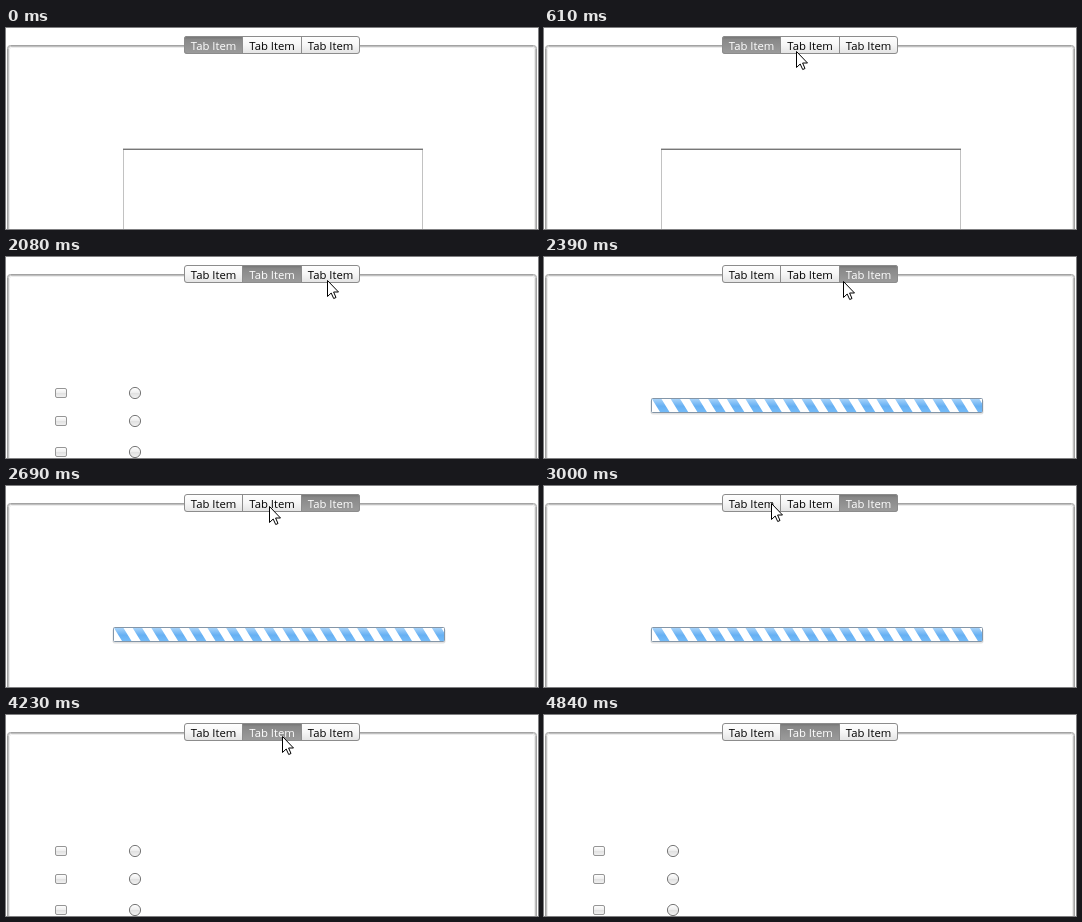
Write an HTML page that moves like this. It is 532 by 201 pixels and loops after 5240 ms.

```html
<!DOCTYPE html>
<html lang="en">
<head>
<meta charset="utf-8">
<title>Tab control</title>
<style>
html, body { margin: 0; width: 100%; height: 100%; overflow: hidden; background: #fff; }
svg { display: block; width: 532px; height: 201px; }
text { font: 11.3px "Open Sans", "Noto Sans", sans-serif; }
text.on { fill: #fff; font-weight: 500; }
</style>
</head>
<body>
<svg viewBox="0 0 532 201">
  <defs>
    <linearGradient id="face" x2="0" y2="1">
      <stop stop-color="#fff"/><stop offset=".5" stop-color="#f6f6f6"/><stop offset="1" stop-color="#e2e2e2"/>
    </linearGradient>
    <linearGradient id="pressed" x2="0" y2="1">
      <stop stop-color="#707070"/><stop offset=".2" stop-color="#888"/><stop offset="1" stop-color="#9c9c9c"/>
    </linearGradient>
    <linearGradient id="mark" x2="0" y2="1">
      <stop stop-color="#fff"/><stop offset=".45" stop-color="#f0f0f0"/>
      <stop offset=".5" stop-color="#e0e0e0"/><stop offset="1" stop-color="#f2f2f2"/>
    </linearGradient>
    <linearGradient id="stripe" x2="0" y2="1">
      <stop stop-color="#a6d2f9"/><stop offset=".55" stop-color="#66b0f3"/><stop offset="1" stop-color="#74bbf8"/>
    </linearGradient>
    <clipPath id="strip"><rect x="178" y="8" width="176" height="18" rx="3"/></clipPath>
    <clipPath id="bar"><rect x="108" y="142" width="330" height="13"/></clipPath>
  </defs>
  <rect width="532" height="201" fill="#fff"/>
  <g fill="none">
    <rect x="3.5" y="19.5" width="525" height="220" rx="2" stroke="#ececec"/>
    <rect x="2.5" y="18.5" width="527" height="220" rx="2" stroke="#c0c0c0"/>
    <rect x="1.5" y="17.5" width="529" height="220" rx="3" stroke="#a3a3a3"/>
  </g>

  <g class="page">
    <path id="sides" d="M117.5 201V121M416.5 201V121" stroke="#c2c2c2"/>
    <path id="top" d="M117 121.5H417" stroke="#777"/>
    <path d="M117 120.5H417" stroke="#c6c6c6"/>
  </g>
  <g class="page" id="choices" fill="url(#mark)"></g>
  <g class="page">
    <rect x="106.5" y="142.5" width="333" height="15" rx="2" fill="#e2e2e2"/>
    <rect x="107.5" y="141.5" width="331" height="14" rx="1" fill="#fff"/>
    <path id="stripes" fill="url(#stripe)" clip-path="url(#bar)"/>
    <rect x="107.5" y="141.5" width="331" height="14" rx="1" fill="none" stroke="#8496a8"/>
  </g>

  <g clip-path="url(#strip)">
    <rect x="178" y="8" width="176" height="18" fill="url(#face)"/>
    <rect id="selected" y="8" height="18" fill="url(#pressed)"/>
    <path d="M236.5 8V26M295.5 8V26" stroke="#8c8c8c"/>
  </g>
  <rect x="178.5" y="8.5" width="175" height="17" rx="2.5" fill="none" stroke="#8c8c8c"/>
  <g id="labels"></g>

  <path id="cursor" d="M.5.5V16.5L4.2 13L6.7 18.5L9 17.5L6.6 12H11.5Z" fill="#fff" stroke="#000"/>
</svg>
<script>
const LOOP = 5240, START = 378, STEP = 76.9, STEPS = 58;
const $ = id => document.getElementById(id);

// Pointer legs between rests: leave and arrive in steps, then the end point.
const entry = { x: 330, y: 170 };
const legs = [
  [0, 3, 252, 23], [3, 6, 253, 11], [6, 8, 258, 16],
  [11, 18, 309, 23], [18, 22, 321, 23],
  [24, 26, 299, 24], [26, 35.5, 214, 17],
  [38, 45, 294, 64], [45, 48, 276, 21],
  [50, 52, 313, 47], [52, 57, 450, 194]
].map(([leave, arrive, x, y]) => ({ leave, arrive, x, y }));
const clicks = [10, 24, 37, 49]; // each click selects the next tab

const tabEdge = i => Math.min(178 + i * 59, 354);
$("labels").innerHTML = [0, 1, 2].map(i =>
  `<text x="${184.8 + i * 58.5}" y="22">Tab Item</text>`).join("");
$("choices").innerHTML = [136, 164, 195].map(y =>
  `<rect x="49.5" y="${y - 4.5}" width="11" height="9" rx="1.5" stroke="#969696"/>
   <circle cx="129" cy="${y}" r="5.6" stroke="#777"/>`).join("");

let stripes = "";
for (let i = -1; i < 18; i++) stripes += `M${108 + i * 18.7} 142h9.5l8 13h-9.5Z`;
$("stripes").setAttribute("d", stripes);

const pages = document.querySelectorAll(".page");
const labels = document.querySelectorAll("text");

function cursorAt(step) {
  const i = legs.findLastIndex(leg => leg.leave <= step);
  const to = legs[i], from = legs[i - 1] || entry;
  const u = Math.min(1, (step - to.leave) / (to.arrive - to.leave));
  const rise = 1 - (1 - u) ** 1.6;
  return {
    x: Math.round(from.x + (to.x - from.x) * u),
    y: Math.round(from.y + (to.y - from.y) * rise)
  };
}

function draw(time) {
  const step = Math.floor((time % LOOP - START) / STEP);
  const tab = clicks.filter(at => step >= at).length % 3;
  pages.forEach((p, i) => p.style.display = i === tab ? "" : "none");
  labels.forEach((l, i) => l.classList.toggle("on", i === tab));
  $("selected").setAttribute("x", tabEdge(tab));
  $("selected").setAttribute("width", tabEdge(tab + 1) - tabEdge(tab));

  const shown = step >= 0 && step < STEPS;
  $("cursor").style.display = shown ? "" : "none";
  let hover = false;
  if (shown) {
    const { x, y } = cursorAt(step);
    $("cursor").setAttribute("transform", `translate(${x} ${y})`);
    hover = tab === 0 && y > 121 && x > 117 && x < 417;
  }
  $("sides").setAttribute("stroke", hover ? "#99c1e2" : "#c2c2c2");
  $("top").setAttribute("stroke", hover ? "#6f9fc4" : "#777");
}

function tick() {
  draw(performance.now());
  requestAnimationFrame(tick);
}
tick();
</script>
</body>
</html>
```
